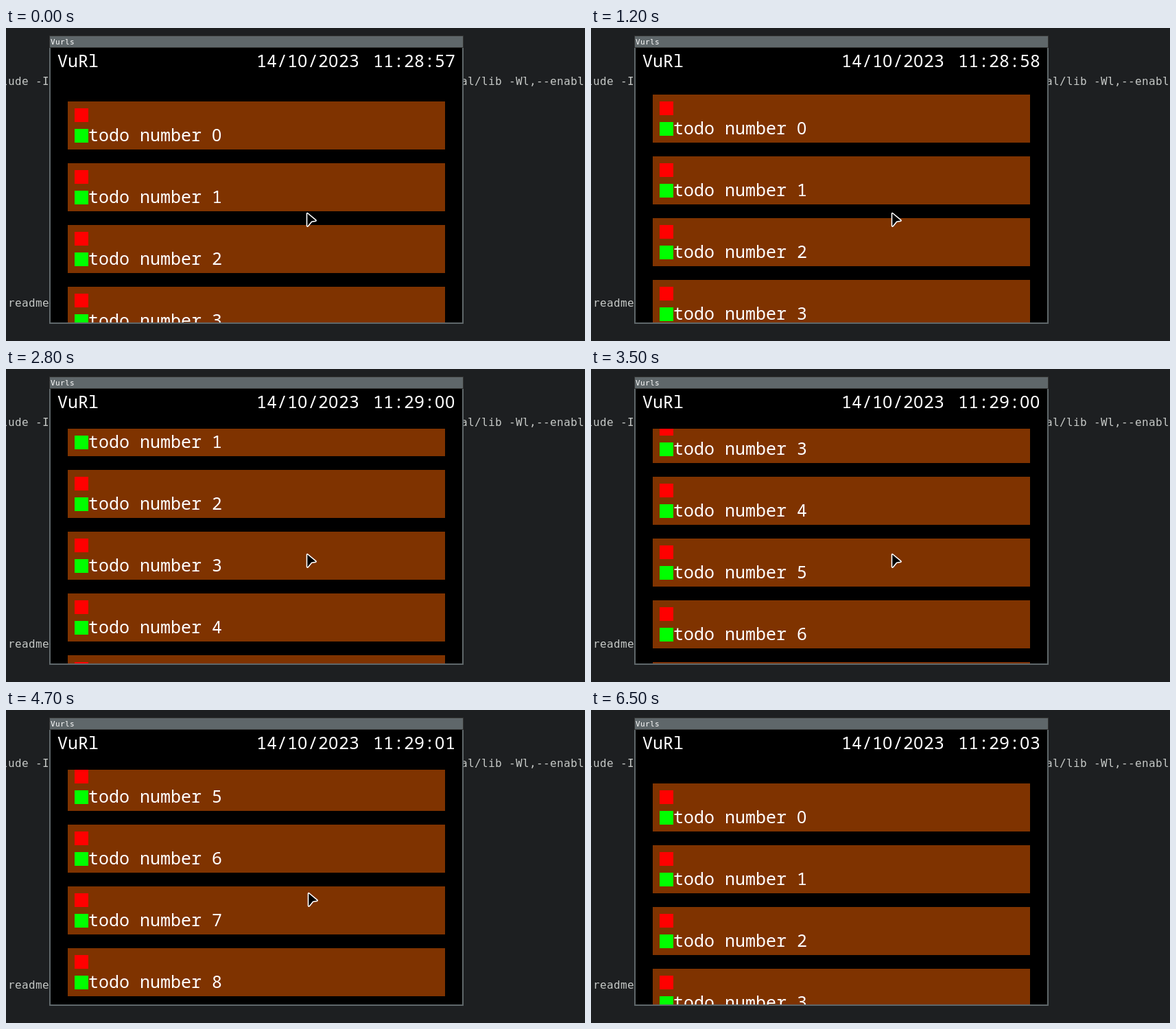
Recreate the animation shown at these times as an HTML page. Size 844 by 456 pixels, loop 6.8 s.

```html
<!DOCTYPE html>
<html lang="en">
<head>
<meta charset="utf-8">
<title>Todo list</title>
<style>
  html, body { margin: 0; width: 100%; height: 100%; overflow: hidden; background: #1d1f21; }
  svg { display: block; width: 844px; height: 456px; }
  text { white-space: pre; fill: #fff; }
  .term { font: 16px "DejaVu Sans Mono", monospace; letter-spacing: .37px; fill: #c5c8c6; }
  .title { font: 11px "DejaVu Sans Mono", monospace; letter-spacing: .38px; }
  .app { font: 25px "Noto Sans Mono", monospace; }
  .zero { font-family: "Noto Sans", sans-serif; letter-spacing: .7px; }
</style>
</head>
<body>
<svg viewBox="0 0 844 456">
  <defs><clipPath id="view"><rect x="90" y="87" width="550" height="342"/></clipPath></defs>

  <text class="term" x="-7" y="83">lude -I</text>
  <text class="term" x="663" y="83">al/lib -Wl,--enabl</text>
  <text class="term" x="3" y="406">readme</text>

  <rect x="63" y="29" width="604" height="402" fill="#5f676a"/>
  <rect x="65" y="29" width="600" height="400"/>
  <rect x="63.5" y="11.5" width="603" height="17" fill="#5f676a" stroke="#333"/>
  <text class="title" x="65" y="24">Vurls</text>
  <text class="app" x="75" y="57">VuRl</text>
  <text class="app" id="date" x="365" y="57"></text>
  <text class="app" id="time" x="535" y="57"></text>

  <g clip-path="url(#view)"><g id="list"></g></g>

  <path id="cursor" d="M1.5 2.6Q1.6 1 3 2L14.6 11.6Q15.8 13 14 13.4L8.6 14.2L3.6 20.4Q1.8 22 1.5 20Z"
        fill="#000" stroke="#fff" stroke-width="1.6" stroke-linejoin="round"/>
</svg>
<script>
const LOOP = 6800;
const TICK = 100;
const START = 11 * 3600 + 28 * 60 + 57;

// Turns of the mouse wheel: start in ms, number of ticks, offset reached
const turns = [
  [500, 1, 10], [700, 3, 40], [1100, 2, 10], [1700, 3, 40], [2100, 2, 60],
  [2500, 4, 140], [3300, 6, 480], [5000, 1, 390], [5200, 3, 230], [5600, 6, 0]
];

const $ = id => document.getElementById(id);
const plainZeros = s => s.replace(/0/g, '<tspan class="zero">0</tspan>');
const clamp = p => Math.min(1, Math.max(0, p));
const mix = (a, b, p) => a + (b - a) * p;

// The wheel moves the list by whole notches of 10 px
function scrollAt(t) {
  let y = 0;
  for (const [start, ticks, end] of turns) {
    y = mix(y, end, clamp(((t - start) / TICK + 1) / ticks));
  }
  return Math.round(y / 10) * 10;
}

// Rests, is nudged, then glides out through the title bar
function pointerAt(t) {
  if (t < 4700) return [437, 268];
  const p = 1 - (1 - clamp((t - 6000) / 400)) ** 1.75;
  return [mix(439, 109, p), mix(265, 11, p)];
}

function clockAt(t) {
  const s = START + Math.floor((t + 200) / 1000);
  return [s / 3600, s / 60 % 60, s % 60]
    .map(n => String(Math.floor(n)).padStart(2, "0")).join(":");
}

function item(i) {
  return `<g transform="translate(90 ${107 + i * 90})">
    <rect width="550" height="70" fill="#7f3300"/>
    <rect x="10" y="10" width="20" height="20" fill="#f00"/>
    <rect x="10" y="40" width="20" height="20" fill="#0f0"/>
    <text class="app" x="30" y="58">todo number ${plainZeros(String(i))}</text>
  </g>`;
}

$("list").innerHTML = Array.from({ length: 9 }, (_, i) => item(i)).join("");
$("date").innerHTML = plainZeros("14/10/2023");

function draw() {
  const now = performance.now() % LOOP;
  const t = Math.floor(now / TICK) * TICK;
  $("list").setAttribute("transform", `translate(0 ${-scrollAt(t)})`);
  $("cursor").setAttribute("transform", `translate(${pointerAt(t).map(Math.round)})`);
  $("cursor").setAttribute("visibility", t < 6500 ? "visible" : "hidden");
  $("time").innerHTML = plainZeros(clockAt(t));
  requestAnimationFrame(draw);
}
draw();
</script>
</body>
</html>
```
